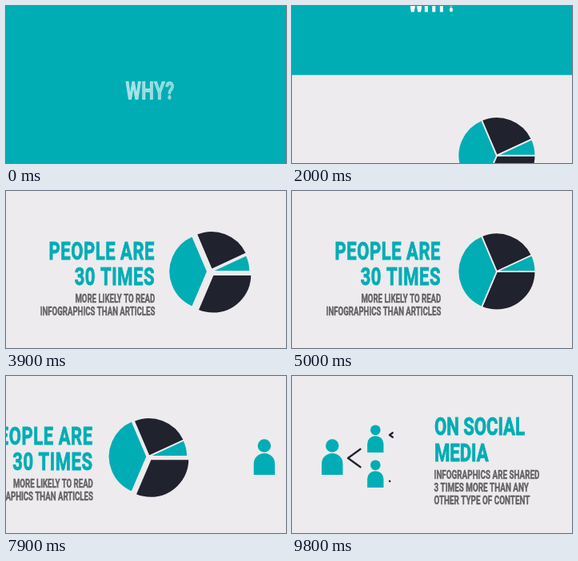
Write an HTML page with a canvas that moves like this. It is 350x197 px and loops after 9.9 s.

```html
<!DOCTYPE html>
<html lang="en">
<head>
<meta charset="utf-8">
<title>Why infographics</title>
<style>
html, body { margin: 0; width: 100%; height: 100%; overflow: hidden; background: #edebee; }
canvas { display: block; width: 350px; height: 197px; }
</style>
</head>
<body>
<canvas id="stage" width="350" height="197"></canvas>
<script>
const LOOP = 9900, W = 350, H = 197;
const TEAL = '#00adb5', DARK = '#20222e', GREY = '#626164', PAPER = '#edebee';
const ctx = document.getElementById('stage').getContext('2d');

const clamp = v => Math.max(0, Math.min(1, v));
const span = (t, start, length) => clamp((t - start) / length);
const easeOut = p => 1 - (1 - p) ** 3;
const easeInOut = p => p < .5 ? 4 * p ** 3 : 1 - 4 * (1 - p) ** 3;
const bump = (t, start, length) => Math.sin(Math.PI * span(t, start, length));
const backOut = p => 1 + 2.2 * (p - 1) ** 3 + 1.2 * (p - 1) ** 2;

// Condensed capitals: one width factor for each text style
const HEAD = { squeeze: .72, length: 900, stagger: 20, shift: .6 };
const BODY = { squeeze: .65, length: 900, stagger: 15, shift: .35, color: GREY };
const TITLE = { ...HEAD, size: 30.7, color: '#fff', align: .5, length: 1600, stagger: 33 };
const HEAD_LEFT = { ...HEAD, size: 30.5, color: TEAL, align: 1, spacing: .8 };
const BODY_LEFT = { ...BODY, size: 14.8, align: 1 };
const HEAD_RIGHT = { ...HEAD, size: 30.8, color: TEAL, spacing: -.1 };
const BODY_RIGHT = { ...BODY, size: 15.2 };

// Letters fade in one after another while sliding to the left
function write(text, x, y, start, t, style) {
  const { squeeze, size, color, length, stagger, shift, align = 0, spacing = 0 } = style;
  ctx.save();
  ctx.font = `700 ${size}px Roboto, "Liberation Sans", sans-serif`;
  ctx.letterSpacing = spacing + 'px';
  ctx.fillStyle = ctx.strokeStyle = color;
  ctx.lineWidth = size * .03;
  ctx.lineJoin = 'miter';
  ctx.translate(x, y);
  ctx.scale(squeeze, 1);
  const left = -align * ctx.measureText(text).width;
  [...text].forEach((letter, i) => {
    const p = span(t, start + i * stagger, length);
    const before = ctx.measureText(text.slice(0, i + 1)).width - ctx.measureText(letter).width;
    const pos = left + before + shift * size * (1 - easeOut(p)) / squeeze;
    ctx.globalAlpha = clamp(p * 1.6);
    ctx.fillText(letter, pos, 0);
    ctx.strokeText(letter, pos, 0);
  });
  ctx.restore();
}

// Slices move out and back one after another, clockwise
function pie(t) {
  const radius = 48.4 - 2 * bump(t, 2400, 1050);
  const slices = [[0, 113, DARK], [113, 247, TEAL], [247, 335, DARK], [335, 360, TEAL]];
  const rad = Math.PI / 180;
  ctx.strokeStyle = PAPER;
  ctx.lineWidth = 1.8;
  ctx.lineJoin = 'round';
  slices.forEach(([from, to, color], i) => {
    const delay = i * 120, mid = (from + to) / 2 * rad;
    const spread = 5 * (bump(t, 3500 + delay, 900) + bump(t, 7640 + delay, 900));
    const x = 256 + Math.cos(mid) * spread, y = 101 + Math.sin(mid) * spread;
    ctx.beginPath();
    ctx.moveTo(x, y);
    ctx.arc(x, y, radius, from * rad, to * rad);
    ctx.closePath();
    ctx.fillStyle = color;
    ctx.fill();
    ctx.stroke();
  });
}

function person(x, y, scale) {
  if (scale <= 0) return;
  ctx.save();
  ctx.translate(x, y);
  ctx.scale(scale, scale);
  ctx.fillStyle = TEAL;
  ctx.beginPath();
  ctx.arc(0, -14.5, 8.2, 0, 7);
  ctx.fill();
  ctx.beginPath();
  ctx.roundRect(-13.2, -5, 26.4, 27, [13, 13, 0, 0]);
  ctx.fill();
  ctx.restore();
}

// Two strokes growing out of a shared corner
function fork(x, y, p) {
  if (p <= 0) return;
  ctx.strokeStyle = DARK;
  ctx.lineWidth = 2.3;
  ctx.lineCap = ctx.lineJoin = 'round';
  ctx.beginPath();
  ctx.moveTo(x + 15.5 * p, y - 11.3 * p);
  ctx.lineTo(x, y);
  ctx.lineTo(x + 15.5 * p, y + 11.3 * p);
  ctx.stroke();
}

function draw(t) {
  const rise = H * easeInOut(span(t, 1480, 1000));
  const slide = W * easeInOut(span(t, 7520, 1000));
  ctx.fillStyle = PAPER;
  ctx.fillRect(0, 0, W, H);

  if (rise < H) {
    ctx.fillStyle = TEAL;
    ctx.fillRect(0, -rise, W, H);
    write('WHY?', 175, 117.3 - rise, -620, t, TITLE);
  }

  if (rise > 0 && slide < W) {
    ctx.save();
    ctx.translate(-slide, H - rise);
    write('PEOPLE ARE', 186, 86.4, 2000, t, HEAD_LEFT);
    write('30 TIMES', 186, 118.4, 2080, t, HEAD_LEFT);
    write('MORE LIKELY TO READ', 186.3, 140.1, 2150, t, BODY_LEFT);
    write('INFOGRAPHICS THAN ARTICLES', 186.3, 155.6, 2150, t, BODY_LEFT);
    pie(t);
    ctx.restore();
  }

  if (slide > 0) {
    ctx.save();
    ctx.translate(W - slide, 0);
    person(50.3, 102, 1);
    fork(70, 103, easeOut(span(t, 8750, 400)));
    person(104.3, 79, .77 * backOut(span(t, 9150, 450)));
    person(104.3, 123, .77 * backOut(span(t, 9250, 450)));
    fork(122, 74, span(t, 9715, 350));
    fork(122, 132, span(t, 9795, 350));
    write('ON SOCIAL', 178, 74.3, 8560, t, HEAD_RIGHT);
    write('MEDIA', 178, 107.3, 8640, t, HEAD_RIGHT);
    write('INFOGRAPHICS ARE SHARED', 177.5, 129.2, 8620, t, BODY_RIGHT);
    write('3 TIMES MORE THAN ANY', 177.5, 145, 8680, t, BODY_RIGHT);
    write('OTHER TYPE OF CONTENT', 177.5, 160.7, 8740, t, BODY_RIGHT);
    ctx.restore();
  }
}

function frame() {
  draw(performance.now() % LOOP);
  requestAnimationFrame(frame);
}
frame();
</script>
</body>
</html>
```
